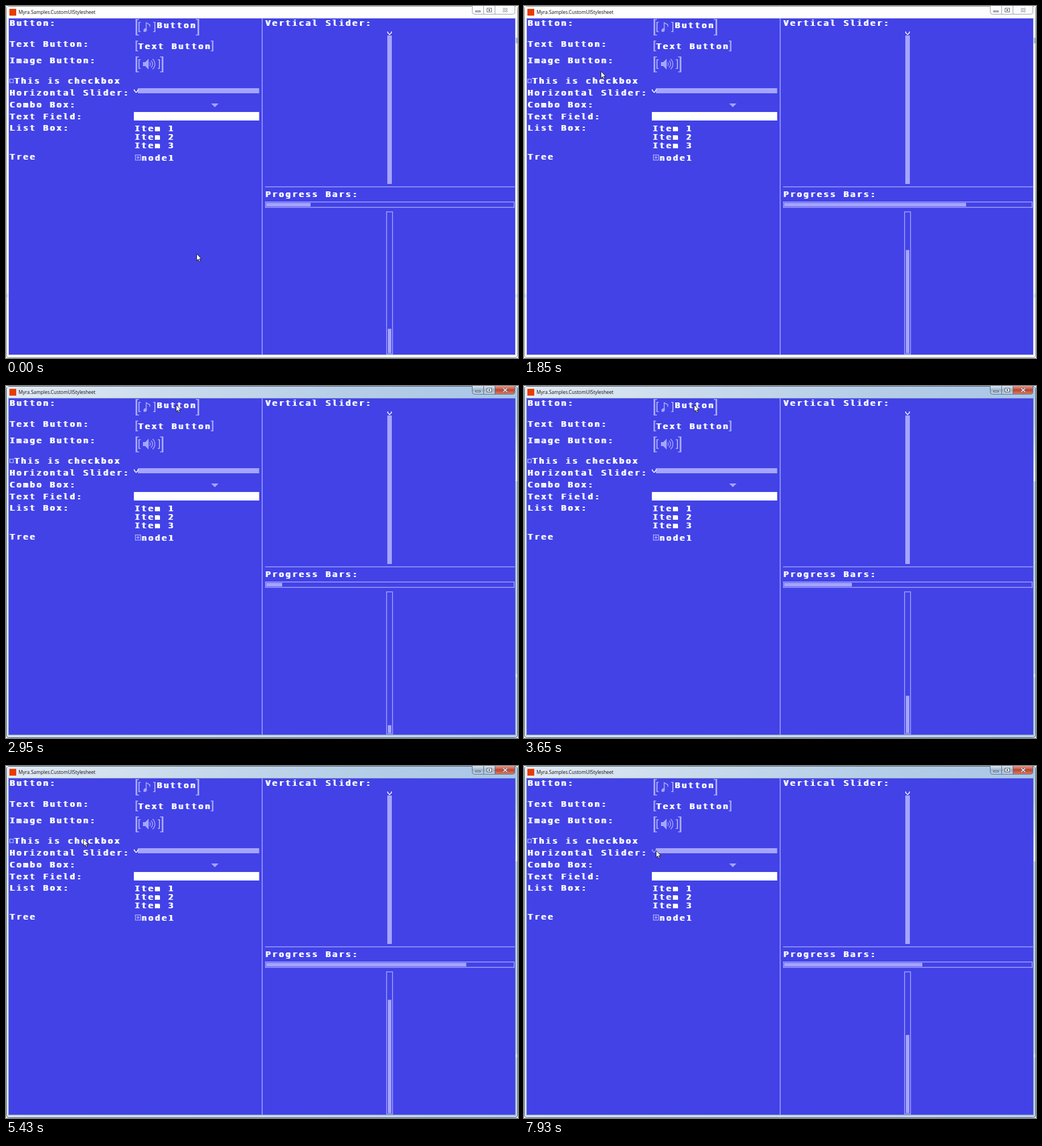
Animation of 901 by 621 pixels, one loop 7990 ms. Source, as an HTML page with a canvas:

```html
<!DOCTYPE html>
<html lang="en">
<head>
<meta charset="utf-8">
<title>Custom UI stylesheet</title>
<style>
  html, body { margin: 0; width: 100%; height: 100%; overflow: hidden; background: #fff; }
  canvas { display: block; }
</style>
</head>
<body>
<canvas id="stage" width="901" height="621"></canvas>
<script>
const ctx = document.getElementById('stage').getContext('2d');
const BLUE = '#4242e7', LIGHT = '#a5a5ff', WHITE = '#fff';
const LOOP = 7990, BAR = 435, START = 78, SPEED = 0.1305;
const ACTIVE_AT = 2720, CHECK_ON = 5700, CHECK_OFF = 6350, HOVER_AT = 7400;

// Stops of the pointer: [time, x, y]
const STOPS = [[0, 335, 437], [850, 338, 131], [1090, 280, 177], [1700, 99, 132], [2560, 304, 33],
  [2950, 299, 33], [3800, 299, 33], [4430, 384, 80], [5400, 136, 129], [6600, 136, 129],
  [7300, 232, 149], [LOOP, 232, 149]];

function pointerAt(t) {
  const i = STOPS.findIndex(stop => stop[0] > t);
  const [t0, x0, y0] = STOPS[i - 1], [t1, x1, y1] = STOPS[i];
  const p = (t - t0) / (t1 - t0);
  return [Math.round(x0 + (x1 - x0) * p), Math.round(y0 + (y1 - y0) * p)];
}

function rect(x, y, w, h, color) {
  ctx.fillStyle = color;
  ctx.fillRect(x, y, w, h);
}

function frame(x, y, w, h, color = LIGHT, line = 1.4) {
  ctx.strokeStyle = color;
  ctx.lineWidth = line;
  ctx.strokeRect(x + line / 2, y + line / 2, w - line, h - line);
}

function fill(d, color, x = 0, y = 0) {
  ctx.save();
  ctx.translate(x, y);
  ctx.fillStyle = color;
  ctx.fill(new Path2D(d));
  ctx.restore();
}

function stroke(d, color, line, x = 0, y = 0) {
  ctx.save();
  ctx.translate(x, y);
  ctx.strokeStyle = color;
  ctx.lineWidth = line;
  ctx.stroke(new Path2D(d));
  ctx.restore();
}

function gradient(x, y, x2, y2, ...colors) {
  const g = ctx.createLinearGradient(x, y, x2, y2);
  colors.forEach((c, i) => g.addColorStop(i / (colors.length - 1), c));
  return g;
}

// Overlaid copies give the heavy verticals of the bitmap lettering.
function label(text, x, y) {
  ctx.font = '14px "DejaVu Sans Mono", monospace';
  ctx.letterSpacing = '3.32px';
  ctx.fillStyle = WHITE;
  for (let dx = 0; dx <= 2; dx++) ctx.fillText(text, x + dx, y);
  ctx.letterSpacing = '0px';
}

function brackets(x, y, w, h, arm, line) {
  for (const [edge, tip] of [[x, x], [x + w - line, x + w - arm]]) {
    rect(edge, y, line, h, LIGHT);
    rect(tip, y, arm, 1.5, LIGHT);
    rect(tip, y + h - 1.5, arm, 1.5, LIGHT);
  }
}

function knob(x, y, color) {
  stroke('M.7 0v2l3.3 3.5 3.3-3.5v-2', color, 1.5, x, y);
}

function note() {
  stroke('M4.7 14V1.5L11 5v3.5', LIGHT, 1.6, 242, 28);
  fill('M0 13.5L2 11.5H5.5V16L4 17.5H0z', LIGHT, 242, 28);
}

function speaker() {
  fill('M0 6H4L10 0V19L4 13H0z', LIGHT, 241, 93);
  for (const r of [4, 8, 12]) {
    ctx.beginPath();
    ctx.arc(250, 102.5, r, -0.85, 0.85);
    ctx.strokeStyle = LIGHT;
    ctx.lineWidth = 1.5;
    ctx.stroke();
  }
}

function titleButtons(active) {
  const edge = active ? '#5d7086' : '#9aa3ae', ink = active ? '#4c5866' : '#656c76';
  ctx.save();
  ctx.beginPath();
  ctx.roundRect(820.5, -4, 75, 18.5, 4);
  ctx.clip();
  rect(820, 0, 76, 15, active ? gradient(0, 0, 0, 14, '#dce7f2', '#9db4cd', '#bed3e8') : '#fafbfd');
  if (active) rect(861, 0, 35, 15, gradient(0, 0, 0, 14, '#e3a195', '#c0432d', '#d77b61'));
  ctx.restore();
  ctx.strokeStyle = edge;
  ctx.lineWidth = 1;
  ctx.stroke();
  for (const x of [840, 860]) rect(x, 0, 1, 14, edge);

  rect(826, 8, 9, 3, ink);
  rect(827, 9, 7, 1, WHITE);
  rect(846, 3.5, 9, 7.5, ink);
  rect(847, 4.5, 7, 5.5, WHITE);
  frame(849, 6, 3, 2.5, ink, 1);
  stroke('M0 0l7 6.5M7 0L0 6.5', ink, 2.8, 875, 4);
  stroke('M0 0l7 6.5M7 0L0 6.5', WHITE, 1.4, 875, 4);
}

function windowFrame(active) {
  rect(0, 0, 901, 621, WHITE);
  ctx.beginPath();
  ctx.roundRect(0.5, 0.5, 900, 620, 5);
  ctx.fillStyle = active ? gradient(0, 0, 901, 0, '#d3e1ef', '#c5d9ed', '#b5d0ec') : '#f9fbfd';
  ctx.fill();
  ctx.strokeStyle = active ? '#4d5b69' : '#868b91';
  ctx.lineWidth = 1;
  ctx.stroke();
  if (active) {
    rect(2, 1, 897, 20, gradient(0, 0, 897, 0, '#e3ebf4', '#c9daec', '#b5cee8', '#a9c6e6'));
    rect(897, 60, 3, 108, gradient(0, 60, 0, 168, '#b5d0ec', '#f4f9fd'));
  } else {
    rect(2, 1, 897, 20, '#fefefe');
    rect(897, 56, 3, 10, '#a4bad8');
  }
  for (const x of [1, 897]) rect(x, 508, 3, 6, '#cfe4f4');

  rect(6, 5, 12, 12, '#e73c00');
  ctx.font = '8.4px "Open Sans", sans-serif';
  ctx.fillStyle = '#111';
  ctx.fillText('Myra.Samples.CustomUIStylesheet', 22, 14);
  titleButtons(active);
  rect(4, 21, 893, 595, active ? '#8fa5bd' : '#d9e0e8');
  rect(5, 22, 891, 593, BLUE);
}

function leftPanel(checked, hover) {
  label('Button:', 6, 35);
  brackets(228, 23, 112, 29, 6, 3);
  brackets(233, 28, 30, 18, 4, 2);
  note();
  label('Button', 265, 39);

  label('Text Button:', 6, 72);
  brackets(228, 61, 137, 19, 4.5, 2.5);
  label('Text Button', 232, 76);

  label('Image Button:', 6, 101);
  brackets(228, 89, 49, 28, 6, 3);
  brackets(233, 94, 38, 17, 4, 2);
  speaker();

  frame(6, 128.5, 7.5, 7.5);
  if (checked) rect(8, 130.5, 3.5, 3.5, LIGHT);
  label('This is checkbox', 14, 137);

  ['Horizontal Slider:', 'Combo Box:', 'Text Field:', 'List Box:']
    .forEach((text, i) => label(text, 6, 158 + 20.8 * i));
  rect(232, 145, 213.5, 9, LIGHT);
  knob(225, 147, hover ? LIGHT : WHITE);
  fill('M0 0H13L6.5 6.5z', LIGHT, 361, 172);
  rect(225, 187, 220.5, 15, WHITE);
  for (let n = 1; n <= 3; n++) label('Item ' + n, 226, 206 + 15 * n);

  label('Tree', 6, 271);
  frame(227, 262, 10.5, 10.5);
  stroke('M2.5 5.25h5.5M5.25 2.5v5.5', LIGHT, 1.4, 227, 262);
  label('node1', 238, 273);
}

function rightPanel(progress) {
  rect(450, 22, 1.5, 593, LIGHT);
  rect(456, 318.3, 439.5, 1.4, LIGHT);
  label('Vertical Slider:', 456, 35);
  knob(671, 45, WHITE);
  rect(671, 52, 8, 262, LIGHT);

  label('Progress Bars:', 456, 337);
  frame(456, 345, 439, 11);
  rect(458, 347.3, Math.round(progress), 6.4, LIGHT);
  frame(669, 362.5, 12, 252);
  const height = Math.max(0, Math.round(0.5766 * progress - 2.5));
  rect(672, 612.5 - height, 6, height, LIGHT);
}

function pointer(x, y) {
  const arrow = 'M0 0V12L2.8 9.5 4.8 14 6.7 13.2 4.8 8.8H8.5z';
  fill(arrow, WHITE, x + 0.5, y + 0.2);
  stroke(arrow, '#111', 0.9, x + 0.5, y + 0.2);
}

function draw(t) {
  windowFrame(t >= ACTIVE_AT);
  leftPanel(t >= CHECK_ON && t < CHECK_OFF, t >= HOVER_AT);
  rightPanel((START + SPEED * t) % BAR);
  pointer(...pointerAt(t));
}

const begin = performance.now();
function tick() {
  draw((performance.now() - begin) % LOOP);
  requestAnimationFrame(tick);
}
tick();
</script>
</body>
</html>
```
